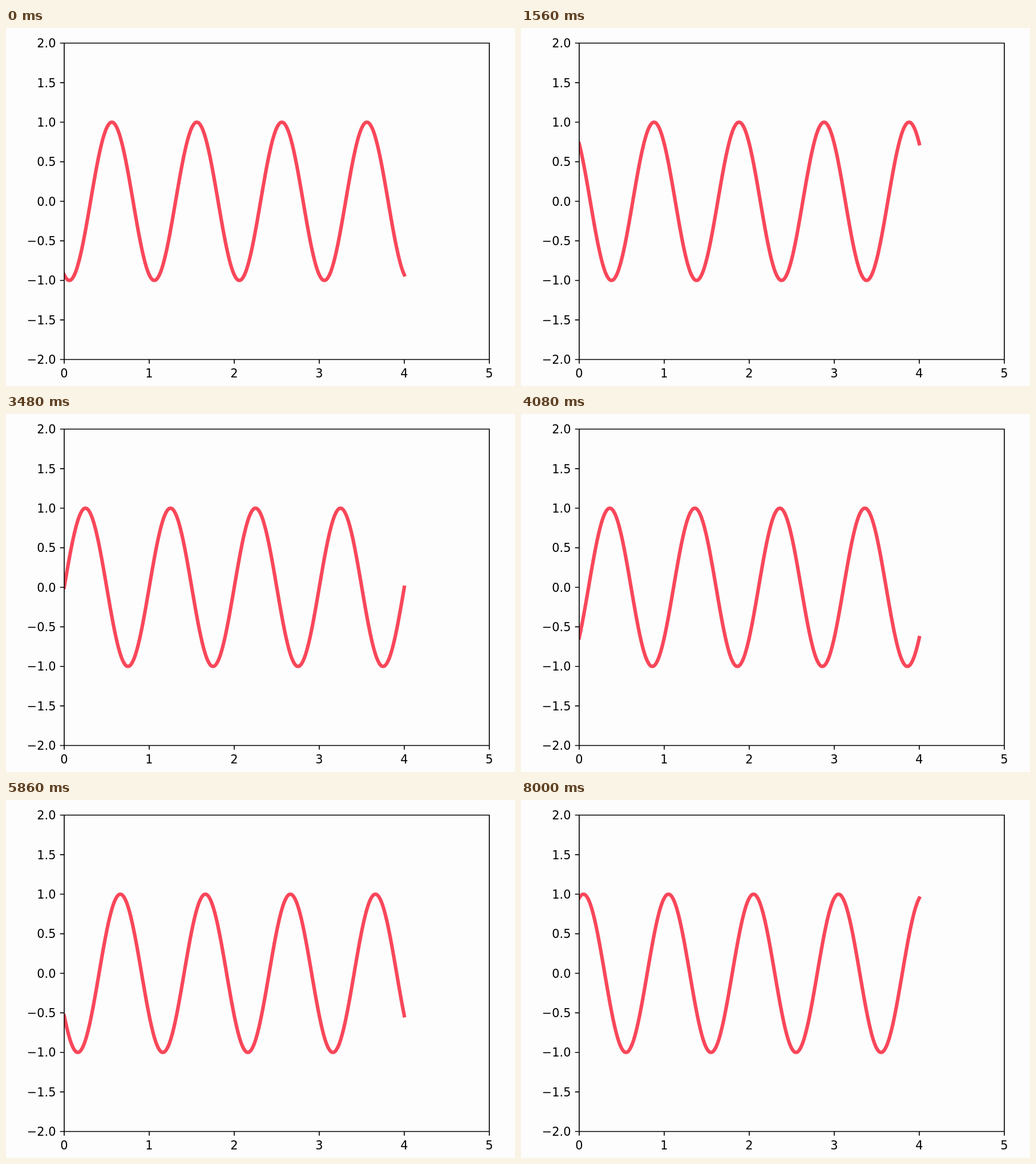
Recreate the animation shown at these times as an HTML page. Size 892 px wide and 628 px high, loop 8.02 s.

```html
<!DOCTYPE html>
<html lang="en">
<head>
<meta charset="utf-8">
<title>Travelling sine wave</title>
<style>
  html, body { margin: 0; width: 100%; height: 100%; overflow: hidden; background: #fdfdfd; }
  svg { display: block; }
  text { font: 20.83px "DejaVu Sans", sans-serif; }
</style>
</head>
<body>
<svg width="892" height="628" viewBox="0 0 892 628">
  <clipPath id="plot"><rect x="102" y="26.5" width="745" height="555"/></clipPath>
  <path id="wave" clip-path="url(#plot)" fill="none" stroke="#f9475a" stroke-width="6.2"
        stroke-linecap="square" stroke-linejoin="round"/>
  <path id="axes" fill="none" stroke="#000" stroke-width="1.67"/>
  <g id="labels"></g>
</svg>
<script>
const LOOP = 8020, TICK = 20;
const $ = id => document.getElementById(id);
const px = x => 102 + 149 * x;
const py = y => 304 - 138.75 * y;

function label(text, x, y, anchor) {
  const el = document.createElementNS("http://www.w3.org/2000/svg", "text");
  el.setAttribute("x", x);
  el.setAttribute("y", y);
  el.setAttribute("text-anchor", anchor);
  el.textContent = text;
  $("labels").append(el);
}

let frame = "M102 26.5H847V581.5H102Z";
for (let x = 0; x <= 5; x++) {
  frame += `M${px(x)} 581.5v7.3`;
  label(x, px(x), 613, "middle");
}
for (let y = -2; y <= 2; y += 0.5) {
  frame += `M102 ${py(y)}h-7.3`;
  label(y.toFixed(1).replace("-", "\u2212"), 87.4, py(y) + 7.7, "end");
}
$("axes").setAttribute("d", frame);

// Runs of updates: first time, last time, number of updates
const runs = [[20, 820, 17], [840, 1560, 17]];
for (let t = 1660; t < 7540; t += 840) runs.push([t, t + 740, 18]);
runs.push([7540, 8000, 12]);

const updates = t => runs.reduce((sum, [from, to, n]) => {
  const done = Math.floor((t - from) / (to - from) * (n - 1) + 1e-6) + 1;
  return sum + Math.max(0, Math.min(n, done));
}, 0);

// Wave shift in hundredths of a period at given times
const keys = [[0, 31], [820, 46], [2360, 79], [3480, 100], [4740, 121], [5860, 141], [8000, 180]]
  .map(([t, shift]) => [updates(t), shift]);

function shiftAt(t) {
  const u = updates(t);
  const i = Math.max(1, keys.findIndex(k => k[0] >= u));
  const [u0, s0] = keys[i - 1], [u1, s1] = keys[i];
  return Math.round(s0 + (s1 - s0) * (u - u0) / (u1 - u0)) / 100;
}

let last;
function draw(now) {
  const shift = shiftAt(Math.floor(now % LOOP / TICK) * TICK);
  if (shift !== last) {
    last = shift;
    const points = Array.from({ length: 401 }, (_, i) => {
      const x = i / 100;
      return px(x).toFixed(2) + " " + py(Math.sin(2 * Math.PI * (x - shift))).toFixed(2);
    });
    $("wave").setAttribute("d", "M" + points.join("L"));
  }
}

const start = performance.now();
function loop() {
  draw(performance.now() - start);
  requestAnimationFrame(loop);
}
loop();
</script>
</body>
</html>
```
